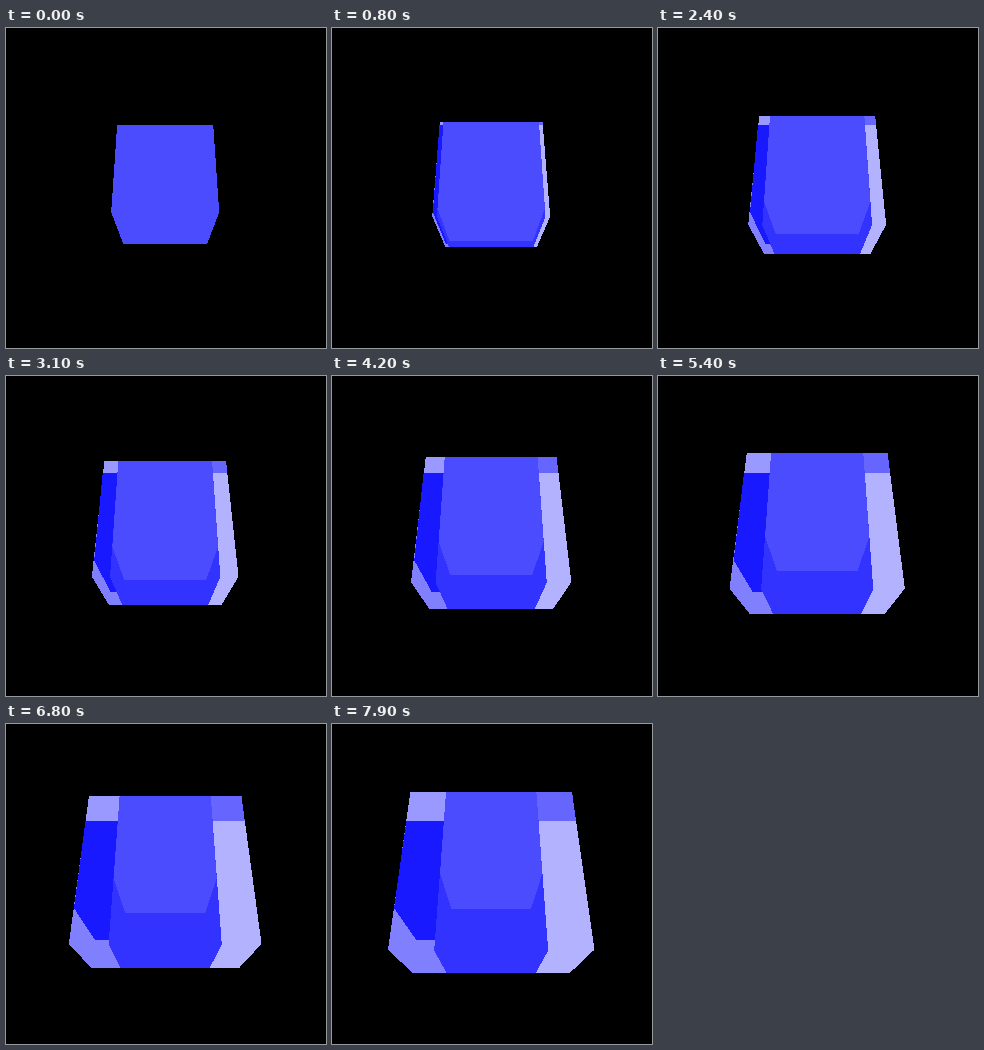
These frames come from a looping animation (320x320 px, 8 s). An HTML page:

```html
<!DOCTYPE html>
<html lang="en">
<head>
<meta charset="utf-8">
<title>Unfolding blue shape</title>
<style>
html, body { margin: 0; width: 100%; height: 100%; overflow: hidden; background: #000; }
svg { display: block; width: 100vw; height: 100vh; }
</style>
</head>
<body>
<svg id="stage" viewBox="0 0 320 320" shape-rendering="crispEdges"></svg>
<script>
const STEP = 100, STEPS = 80, CX = 159.2;
const stage = document.getElementById('stage');

// Each outline is three [half width, y] pairs: top, widest point, bottom.
const closed = [[48, 96.55], [54, 184.2], [42, 215.8]];
const outer = [[80.8, 67.88], [103.2, 225.7], [79, 248.6]];
const wide = [[84.8, 96.55], [97.2, 184.2], [75, 215.8]];
const tall = [[45.2, 67.88], [57, 226.5], [44.8, 248.6]];
const raised = [[45.2, 67.88], [51.2, 149.7], [39.8, 184.7]];

const lerp = (a, b, p) => a + (b - a) * p;
const morph = (to, p) => closed.map((pt, i) => pt.map((v, k) => lerp(v, to[i][k], p)));
const side = (pts, dir) => pts.map(([w, y]) => [CX + dir * w, y]);
const half = (pts, dir) => [[CX, pts[0][1]], ...side(pts, dir), [CX, pts[pts.length - 1][1]]];
const whole = pts => [...side(pts, 1), ...side(pts, -1).reverse()];

function layer(color) {
  const el = document.createElementNS('http://www.w3.org/2000/svg', 'polygon');
  el.setAttribute('fill', color);
  stage.append(el);
  return el;
}

// Back to front
const layers = ['#8080ff', '#b2b2ff', '#9999ff', '#6666ff', '#1919ff', '#3333ff', '#4c4cff'].map(layer);

function draw(p) {
  const out = morph(outer, p);
  const [top, mid] = out;
  const foldY = closed[0][1];
  const foldW = lerp(top[0], mid[0], (foldY - top[1]) / (mid[1] - top[1]));
  const strip = [top, [foldW, foldY]];
  const shapes = [
    half(out, -1),
    half(out, 1),
    half(strip, -1),
    half(strip, 1),
    half(morph(wide, p), -1),
    whole(morph(tall, p)),
    whole(morph(raised, p))
  ];
  shapes.forEach((pts, i) => layers[i].setAttribute('points', pts.join(' ')));
}

const start = performance.now();
function tick() {
  const step = Math.floor((performance.now() - start) / STEP) % STEPS;
  draw(step / (STEPS - 1));
  requestAnimationFrame(tick);
}
tick();
</script>
</body>
</html>
```
